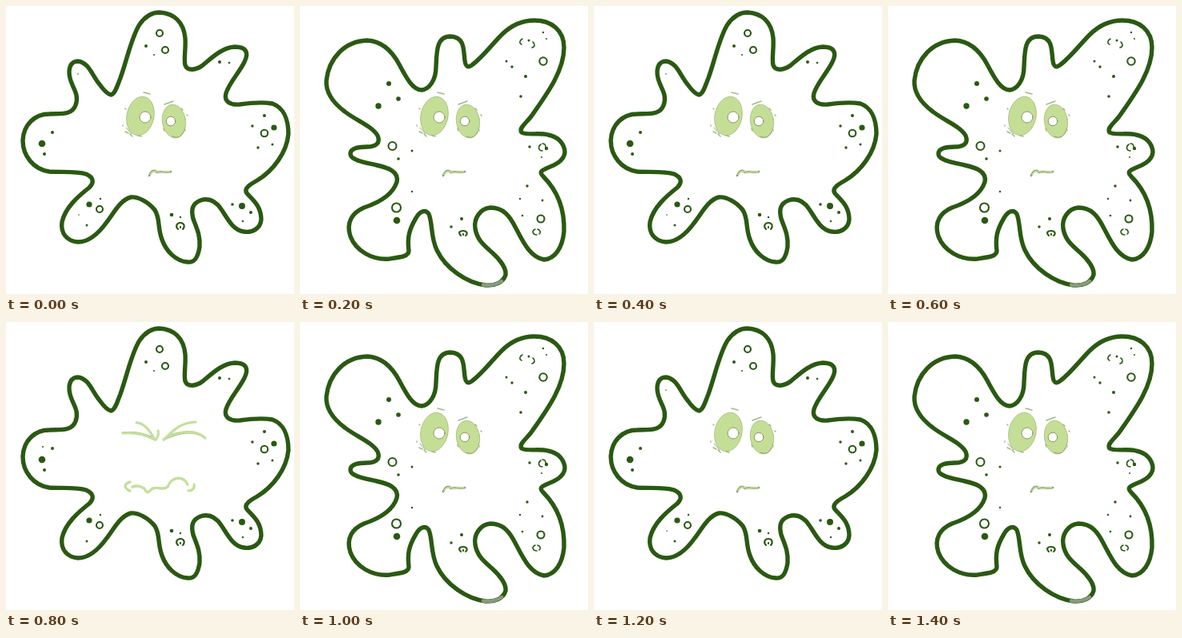
An HTML page for the animation above (1600 ms loop, 360 px wide and 360 px high).

```html
<!DOCTYPE html>
<html lang="en">
<head>
<meta charset="utf-8">
<title>Germ</title>
<style>
html, body { margin: 0; width: 100%; height: 100%; overflow: hidden; background: #fff; }
svg { display: block; width: 100vw; height: 100vh; }
path, ellipse, circle { fill: none; stroke-linecap: round; stroke-linejoin: round; }
.body { stroke: #2a5912; stroke-width: 5.4; }
.dots circle { fill: #2a5912; }
.rings { stroke: #2a5912; stroke-width: 2.1; }
.soft { stroke: #c4df9b; stroke-width: 3.2; }
.edge { stroke: #879a6c; stroke-width: .9; }
.eye { fill: #c4df95; stroke: #9db57a; stroke-width: .7; }
.pupil { fill: #fff; stroke: #6f8450; stroke-width: .8; }
.marks { stroke: #a3b98a; stroke-width: 1.5; }
#spread { animation: first .4s step-end infinite; }
#squash { animation: second .4s step-end infinite; }
.open { animation: open 1.6s step-end infinite; }
.shut { animation: shut 1.6s step-end infinite; }
@keyframes first { 0% { visibility: visible } 50%, 100% { visibility: hidden } }
@keyframes second { 0% { visibility: hidden } 50%, 100% { visibility: visible } }
@keyframes open { 0% { opacity: 1 } 50% { opacity: 0 } 62.5%, 100% { opacity: 1 } }
@keyframes shut { 0% { opacity: 0 } 50% { opacity: 1 } 62.5%, 100% { opacity: 0 } }
</style>
</head>
<body>
<svg viewBox="0 0 360 360">
  <g id="spread">
    <path class="body" d="M192 8C210 9 222 20 224 40C225 54 222 66 224 74C227 82 238 80 246 74C258 64 270 52 286 51C300 51 304 58 298 70C291 84 279 96 275 109C272 120 281 124 292 123C306 121 322 120 333 122C347 127 353 142 353 160C351 183 334 206 314 218C305 223 297 228 301 234C309 243 319 250 319 267C318 278 308 284 297 282C283 280 276 264 269 254C263 245 255 239 243 243C233 247 231 254 234 266C238 277 243 286 242 301C240 314 236 321 227 320C212 319 200 306 195 292C189 276 193 266 186 255C178 245 165 238 156 239C143 242 134 260 126 270C116 284 104 295 90 295C76 294 68 284 70 270C74 252 90 238 104 227C111 220 109 214 100 210C88 206 70 208 54 207C34 204 21 187 21 168C22 148 36 135 54 135C68 134 82 137 87 124C92 110 83 103 80 90C77 78 81 69 90 69C104 71 107 86 117 98C122 105 127 110 131 111C136 111 139 100 143 90C151 68 157 38 167 23C174 13 182 8 192 8Z"/>
    <g class="dots"></g>
    <g class="rings">
      <circle cx="192" cy="34" r="4"/><circle cx="199" cy="55" r="4"/>
      <circle cx="323" cy="159" r="4.3"/><circle cx="117" cy="254" r="4"/>
      <path d="M215 279C211 275 214 271 218 271C223 271 224 276 221 279M218 276v1"/>
    </g>
    <g class="dots open"><circle cx="90" cy="85" r=".8"/><circle cx="91" cy="261" r=".8"/></g>
    <g class="dots shut"><circle cx="46" cy="156" r="1"/></g>
  </g>
  <g id="squash">
    <path class="body" d="M293 18C314 18 330 30 330 52C330 82 307 112 289 138C282 147 273 153 277 158C284 162 298 158 310 161C322 163 331 172 331 183C330 194 318 199 308 203C301 206 299 208 304 213C321 230 331 252 330 282C328 302 319 316 305 317C287 314 278 293 270 278C262 262 254 252 238 252C225 253 217 266 219 278C221 292 230 299 240 308C250 317 258 328 257 336C254 346 243 350 232 349C208 346 182 328 171 305C163 288 166 272 161 260C157 254 150 256 145 265C136 280 134 290 136 306C136 313 126 314 112 316C90 318 70 306 63 288C57 270 66 258 80 252C98 246 116 236 121 220C124 207 110 202 96 199C83 196 63 193 63 185C63 177 74 176 84 176C95 176 101 171 97 162C90 150 70 143 56 132C40 120 32 108 33 93C36 66 55 44 84 43C104 44 116 58 124 73C133 90 141 105 152 105C162 104 170 92 170 76C171 58 170 38 188 38C207 39 204 56 206 68C207 76 210 78 216 73C228 64 240 48 252 36C264 24 278 18 293 18Z"/>
    <path d="M229 348.500C238 350 246 348 252 344" stroke="#879b7b" stroke-width="4.500"/>
    <g class="dots"></g>
    <g class="rings">
      <circle cx="115.500" cy="175" r="5"/><circle cx="120.500" cy="252" r="5.500"/>
      <circle cx="304" cy="69" r="4.700"/><circle cx="301" cy="266" r="4.500"/>
      <path d="M201 287C197 283 200 281 204 281C209 281 210 285 207 287M204 285v1"/>
      <path d="M278 41C274 43 274 47 277 48M290 52C294 51 294 47 291 45M301 173C297 176 298 181 303 181M303 172C306 172 307 174 307 176M294 279C289 281 291 286 296 286M297 279C301 280 301 284 299 285" stroke-width="1.600"/>
    </g>
  </g>
  <g class="open">
    <ellipse class="eye" cx="168" cy="137.500" rx="17" ry="24.500" transform="rotate(12 168 137.500)"/>
    <circle class="pupil" cx="174" cy="139" r="7"/>
    <ellipse class="eye" cx="210" cy="144" rx="14.500" ry="21" transform="rotate(-9 210 144)"/>
    <path class="edge" d="M222 157C219 164 214 166 208 163M150 152L157 160"/>
    <circle class="pupil" cx="206" cy="144" r="5.800"/>
    <path class="marks" d="M172 108L180 110M198 123L209 119M149 128l1 1M146 149v1M149 157l4 2M155 160l3 3M165 162l4 1M219 128l2 2M226 136l1 1M223 153l1 3M197 153l1 3"/>
    <path class="edge" d="M179 212C182 206 185 204 189 208C194 206 200 209 206 207" style="stroke-width:2.600"/>
    <path class="soft" d="M180 211C183 206 186 205 190 208C195 207 200 208 205 207" style="stroke-width:1.500"/>
  </g>
  <g class="shut">
    <g class="edge">
      <path d="M145 138C160 136 172 139 184 144M197 148C213 139 236 134 249 146M163 125C172 125 180 134 187 148M154 199C146 203 147 207 154 212M158 207C164 204 169 207 173 209C176 217 179 213 183 209C190 207 196 211 202 207C208 193 222 193 227 204"/>
    </g>
    <g class="soft">
      <path d="M146 139C158 138 172 140 184 146M163 126C172 126 180 136 186 147M190 136C191 140 190 144 187 147"/>
      <path d="M197 147C207 139 215 126 237 125M197 147C208 138 235 132 249 145"/>
      <path d="M155 200C147 203 147 207 155 211M158 206C164 203 169 206 173 208C176 216 179 212 183 208C190 206 196 210 202 206C208 192 222 192 227 203M235 203C236 208 233 211 228 211"/>
    </g>
  </g>
</svg>
<script>
// Each spot is x, y, radius.
const spots = {
  spread: "175 50 2,185 61 1,267 70 2,279 71 1.3,58 158 2,45 172 4.3,48 185 2,323 137 2,308 150 1.7,335 152 3.6,333 173 1.5,315 177 1.7,104 248 3.6,118 241 1.2,101 274 1.5,207 261 2.3,218 264 1.2,283 248 1.8,295 250 4,306 258 2,296 269 1.2",
  squash: "111 97 3,123 116 2.8,98 125 3.7,123 191 1.8,140 181 1.5,140 232 1.2,121 268 4.3,189 276 1.7,202 266 2,258 69 1.5,265 76 1.7,282 88 2,276 113 1.8,304 33 1.2,308 41 1,286 43 1.5,287 176 1.7,308 178 2.2,302 189 1,284 225 1.7,275 241 1.2,303 243 1.4,278 262 1.3"
};
for (const [id, list] of Object.entries(spots)) {
  document.querySelector(`#${id} .dots`).innerHTML = list.split(",").map(spot => {
    const [x, y, r] = spot.split(" ");
    return `<circle cx="${x}" cy="${y}" r="${r}"/>`;
  }).join("");
}
</script>
</body>
</html>
```
